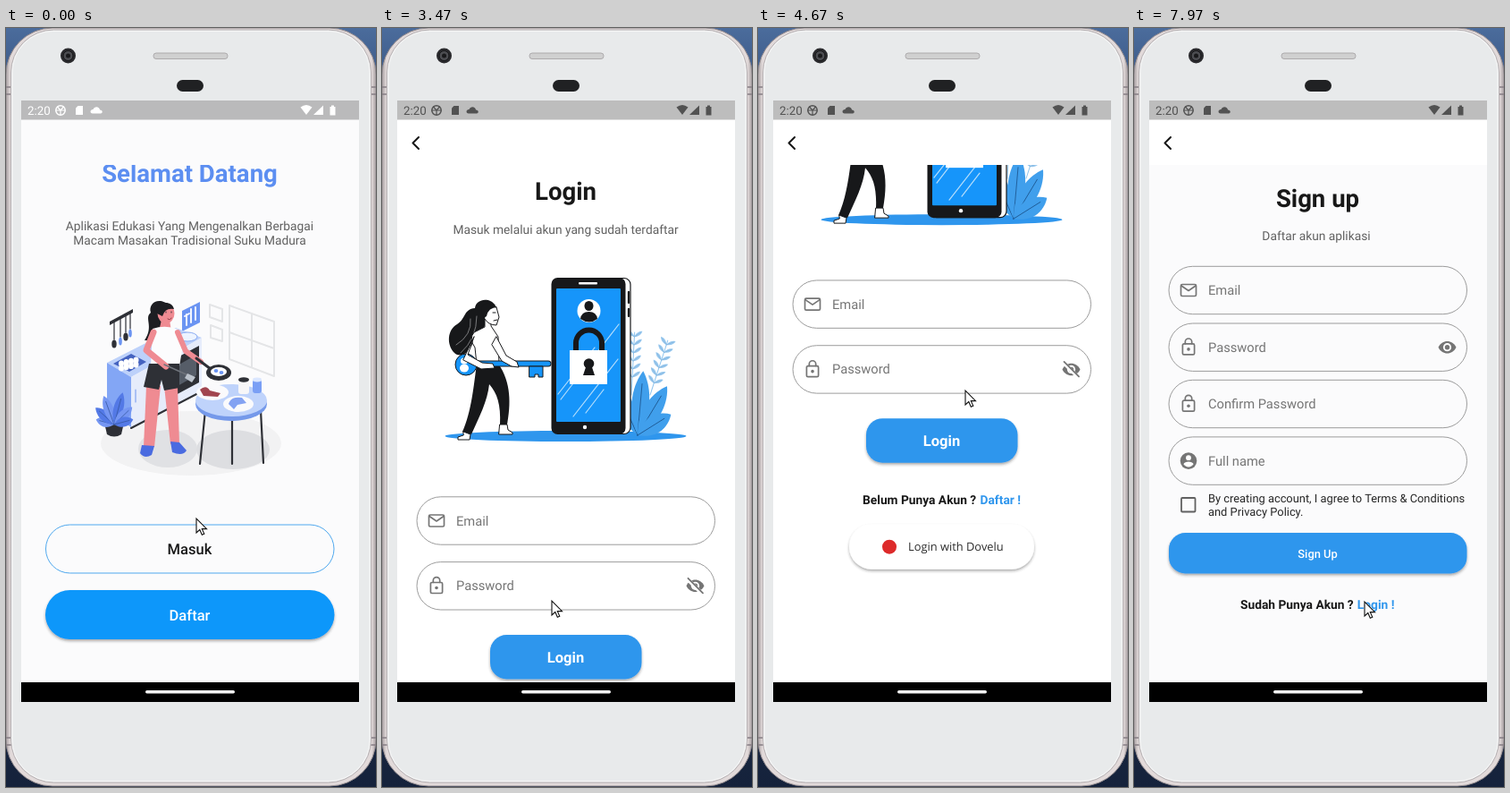
Recreate the animation shown at these times as an HTML page. Size 414 px wide and 848 px high, loop 8000 ms.

```html
<!DOCTYPE html>
<html lang="id">
<head>
<meta charset="utf-8">
<title>Recipe app login</title>
<style>
html, body { margin: 0; width: 100%; height: 100%; overflow: hidden; background: #17253f; }
svg { display: block; width: 414px; height: 848px; }
text { font-family: Roboto, Arial, sans-serif; white-space: pre; text-rendering: geometricPrecision; }
text.open { font-family: "Open Sans", "Noto Sans", sans-serif; }
</style>
</head>
<body>
<svg id="stage" viewBox="0 0 414 848" xmlns="http://www.w3.org/2000/svg">
  <defs>
    <linearGradient id="backdrop" x2="0" y2="1">
      <stop offset="0" stop-color="#4b6c9c"/><stop offset=".1" stop-color="#34507d"/><stop offset="1" stop-color="#15223b"/>
    </linearGradient>
    <linearGradient id="rim">
      <stop offset="0" stop-color="#aaa2a4"/><stop offset=".012" stop-color="#e2dada"/>
      <stop offset=".988" stop-color="#e2dada"/><stop offset="1" stop-color="#aaa2a4"/>
    </linearGradient>
    <clipPath id="screen"><rect x="17" y="81" width="378" height="650"/></clipPath>
    <clipPath id="body"><rect x="17" y="153" width="378" height="578"/></clipPath>
    <filter id="shadow" x="-10%" y="-20%" width="120%" height="150%">
      <feDropShadow dx="0" dy="2" stdDeviation="1.5" flood-color="#333" flood-opacity=".4"/>
    </filter>
  </defs>

  <rect width="414" height="848" fill="url(#backdrop)"/>
  <rect x="301" width="11" height="2" fill="#8f6670"/>
  <rect x="0" y="0" width="414" height="847" rx="52" fill="url(#rim)" stroke="#8f888c"/>
  <path d="M0 66h6M0 74h6M408 66h6M408 74h6M0 793h6M0 801h6M408 793h6M408 801h6" stroke="#857e84" stroke-width="1.5"/>
  <rect x="5.5" y="2" width="403" height="841" rx="48" fill="#e8eaeb" stroke="#b6b0b2"/>
  <rect x="7" y="3.500" width="400" height="838" rx="46" fill="none" stroke="#f7f7f7"/>
  <circle cx="69.500" cy="31" r="8.500" fill="#2a2a2d"/>
  <circle cx="69.500" cy="31" r="5.500" fill="#4c4d51" stroke="#141416"/>
  <circle cx="69.500" cy="31" r="2.500" fill="#19191b"/>
  <rect x="165" y="28" width="83" height="6.500" rx="3" fill="#d0d0d0" stroke="#adabac"/>
  <rect x="191" y="58" width="30" height="13" rx="6.500" fill="#202123"/>

  <g clip-path="url(#screen)">
    <g id="welcome"></g>
    <g id="login"></g>
    <g id="signup"></g>
    <rect x="17" y="81" width="378" height="21.500" fill="#000" fill-opacity=".26"/>
    <g id="status"></g>
  </g>
  <rect x="17" y="731" width="378" height="22"/>
  <rect x="156" y="740" width="100" height="3.500" rx="1.700" fill="#f5f5f5"/>
  <path id="cursor" d="M0 0V16L3.800 12.500 6.300 18.300 8.800 17.200 6.300 11.600H11.500Z" fill="#fff" stroke="#111" stroke-width="1.100"/>
</svg>

<script>
const $ = id => document.getElementById(id);
const INK = '#181818', MUTED = '#616161', HINT = '#757575', BLUE = '#2f96ed', WHITE = '#fff';

// Markup helpers
const text = (x, y, size, str, fill, weight = 400, anchor = 'middle', extra = '') =>
  `<text x="${x}" y="${y}" font-size="${size}" fill="${fill}" font-weight="${weight}" text-anchor="${anchor}" ${extra}>${str}</text>`;
const path = (d, fill, stroke = 'none', width = 1) =>
  `<path d="${d}" fill="${fill}" stroke="${stroke}" stroke-width="${width}" stroke-linecap="round" stroke-linejoin="round"/>`;
const line = (d, stroke, width = 1) => path(d, 'none', stroke, width);
const oval = (x, y, rx, ry, fill, extra = '') =>
  `<ellipse cx="${x}" cy="${y}" rx="${rx}" ry="${ry}" fill="${fill}" ${extra}/>`;
const box = (x, y, w, h, r, fill, extra = '') =>
  `<rect x="${x}" y="${y}" width="${w}" height="${h}" rx="${r}" fill="${fill}" ${extra}/>`;
const at = (x, y, inner) => `<g transform="translate(${x} ${y})">${inner}</g>`;
const leaf = (x, y, angle, length, width, fill, vein) =>
  `<g transform="translate(${x} ${y}) rotate(${angle})">` +
  path(`M0 0C${-width} ${-length * .4} ${-width * .6} ${-length * .8} 0 ${-length}C${width * .6} ${-length * .8} ${width} ${-length * .4} 0 0`, fill) +
  line(`M0 0V${-length * .8}`, vein, .7) + '</g>';

const eye = path('M-10 0C-6 -9 6 -9 10 0C6 9 -6 9 -10 0Z', HINT) +
  oval(0, 0, 4.6, 4.6, WHITE) + oval(0, 0, 2.7, 2.7, HINT);
const icons = {
  mail: box(-8.5, -6.5, 17, 13, 1.5, 'none', `stroke="${HINT}" stroke-width="1.7"`) + line('M-8 -5L0 .5 8 -5', HINT, 1.7),
  lock: box(-6.6, -3.8, 13.2, 12, 1.5, 'none', `stroke="${HINT}" stroke-width="1.7"`) +
    line('M-3.700 -4V-6A3.700 3.700 0 0 1 3.700 -6V-4', HINT, 1.7) + oval(0, 2.2, 1.8, 1.8, HINT),
  user: oval(0, 0, 9.3, 9.3, HINT) + oval(0, -3.4, 2.9, 2.9, WHITE) + path('M-5.600 3.700C-4 0 4 0 5.600 3.700C3 7.800 -3 7.800 -5.600 3.700Z', WHITE),
  eye,
  eyeOff: eye + line('M-9 -7.800L7.500 8.700', WHITE, 4) + line('M-8 -8.500L8.500 8', HINT, 1.8)
};
const field = (y, icon, label, right) =>
  box(39, y - 26.7, 333.5, 53.4, 26.7, 'none', 'stroke="#9c9c9c"') +
  at(61, y, icons[icon]) + text(83, y + 5, 14.7, label, HINT, 400, 'start') +
  (right ? at(350.5, y, icons[right]) : '');
const page = (bg, body, bar = '') =>
  box(17, 81, 378, 650, 0, bg) + bar + `<g clip-path="url(#body)">${body}</g>`;
const back = line('M41 122L34.500 128.500 41 135', INK, 2);

function kitchen() {
  const skin = '#ef8b92', dark = '#2e3036', hair = '#1d1e22', blue = '#6b94f2', pale = '#bdd1fa', grey = '#e4e5e7';
  let s = oval(207, 464, 101, 36, '#f2f2f3') + oval(181, 470, 33, 21, '#e0e1e4') + oval(254, 471, 41, 22, '#dddee1');
  // Window and wall frames
  s += line('M250 310L300 328V389L250 370ZM275 319V379M250 340L300 358M228 309L242 314V328L228 323ZM229 332L242 337V350L229 346Z', grey, 2);
  // Hanging tools
  s += path('M116 328L142 314V318L116 332Z', dark);
  [[121, 327, 26], [128, 323, 27], [134, 320, 25], [139, 318, 23]].forEach(([x, y, h], i) => {
    s += line(`M${x} ${y}V${y + h - 5}`, dark, 1.2) + oval(x, y + h, i % 2 ? 1.8 : 2.7, 4.5, i % 2 ? blue : dark);
  });
  // Shelf and counters
  s += path('M197 316L217 306V329L197 339Z', blue) + line('M202 332V320M207 329V314M212 326V312M200 322L205 319', '#f4f7ff', 2);
  s += path('M113 374L190 335 219 346 140 390Z', pale) + path('M113 374L140 390V446L113 429Z', '#83a6f5') +
    path('M140 390L219 346V405L140 446Z', '#e6ecfb') + path('M188 370L216 355V396L188 411Z', dark) +
    path('M192 377L213 365V388L192 400Z', '#565d68') + line('M140 447L219 406', dark, 2) +
    line('M164 378V432M145 404V418M169 390V404', '#84a5f0', 1.2);
  s += oval(203, 345, 11, 5, '#edf4ff', 'stroke="#8aabf2"');
  s += path('M120 375L140 364 157 373 138 384Z', '#4563c0');
  for (let i = 0; i < 8; i++) s += oval(129 + i % 4 * 5.5, 375 - i % 4 * 1.3 + (i >> 2) * 5, 3, 3.6, WHITE);
  // Potted plant
  s += path('M110 441H132L129 454Q121 459 113 454Z', dark);
  [[-75, 21], [-48, 28], [-20, 34], [15, 37], [46, 28], [75, 22]].forEach(([a, l], i) => {
    s += leaf(121, 443, a, l, 9, i % 2 ? '#5379e6' : '#7596f2', '#34569f');
  });
  // Table
  s += line('M223 427L217 487M285 427L288 486M253 434V487', dark, 2.2) + oval(252, 420, 40, 19, '#7599ea') + oval(252, 416, 40, 18, '#bfd3fb');
  s += oval(231, 407, 18, 9, '#fafafc') + path('M217 404Q224 398 228 405L240 408 237 412 221 411Z', '#a1454f') +
    oval(260, 420, 17, 9, '#fafafc') + path('M249 420Q252 411 264 413L269 419 259 421 255 426Z', '#83a2f2');
  s += box(260, 393, 12, 16, 3, '#f6f6f8') + oval(266, 393, 6, 2.7, dark) + box(276, 393, 10, 15, 3, '#7a9ff5') + oval(281, 393, 5, 2.4, '#dbe7ff');
  // Cook
  s += path('M179 307C168 301 159 309 162 318C154 324 166 333 155 349C169 350 174 335 176 328Z', hair);
  s += path('M157 400H173L166 468H154Z', skin) + path('M177 400H192L194 465H184Z', skin) +
    path('M152 466L166 467 163 477Q155 482 150 475Z', '#4a6be0') + path('M184 462L194 463 202 472Q198 479 186 474Z', '#4a6be0');
  s += oval(179, 319, 9.5, 11, skin) + path('M174 326H183L185 339H171Z', skin) +
    path('M169 319C166 305 186 303 188 314Q178 312 175 322Z', hair) + line('M181 325Q184 327 185 324', '#8d3c45') +
    line('M179 317V318M185 317V318', dark);
  s += path('M164 336Q179 331 193 337L197 360 194 378H162Z', '#fcfcfd') + path('M160 375H194V402L177 405 174 393 171 404 154 401Z', dark);
  s += line('M165 340L157 360 179 378', skin, 7) + line('M192 340L201 361 218 373', skin, 6) +
    line('M177 376L206 389', '#70747c', 1.5) + path('M203 386L212 390 208 396 200 391Z', '#bcc3cc');
  s += line('M213 369L229 381', dark, 3) + oval(238, 385, 14, 9, dark) + oval(238, 384, 9, 5, WHITE) +
    oval(235, 383, 2.4, 2, blue) + oval(241, 385, 2.4, 2, blue);
  return s;
}

function security() {
  const blue = '#1695fa', black = '#17181a';
  let s = oval(205.5, 456, 135, 6, BLUE);
  // Plants
  [[-24, 70], [5, 72], [31, 64], [58, 44]].forEach(([a, l]) => { s += leaf(286, 455, a, l, 16, '#409fec', '#174a80'); });
  const sprig = (x, y, h, tilt) => {
    let g = line(`M0 0V${-h}`, '#90c5ee', 1);
    for (let i = 0; i < 6; i++) for (const side of [-1, 1]) g += leaf(0, -h + i * 9 + 5, side * 52, 11, 3, '#9bcaf0', '#82b5dd');
    return `<g transform="translate(${x} ${y}) rotate(${tilt})">${g}</g>`;
  };
  s += sprig(279, 410, 70, 3) + sprig(300, 410, 64, 18);
  // Phone
  s += box(193, 279.5, 85, 174, 7, WHITE, `stroke="${black}" stroke-width="1.2"`) + box(189.5, 279, 83, 175, 7, black) +
    box(195, 291, 72, 149, 1, blue) + box(220, 284, 21, 2.5, 1, WHITE) + oval(227, 446, 2.2, 2.2, WHITE) +
    line('M276 295V307M276 314V322', black, 2.3);
  s += line('M200 415L265 331M197 409L238 357M214 434L264 370M228 430L248 404', '#b5defc', 1.2);
  s += oval(231.5, 316, 13, 13, WHITE) + oval(231.5, 310.5, 5, 5.5, black) + path('M222 325Q223 317 231.500 317T241 325Q232 332 222 325Z', black);
  s += line('M217 361V352A14 14 0 0 1 246 352V361', black, 6) + box(210, 360, 42, 38, 0, WHITE) +
    oval(231.5, 375, 5.8, 5.8, black) + path('M229 376H234L238 388H225Z', black);
  // Person carrying the key
  s += path('M127 310C120 300 105 303 104 313C91 314 94 325 84 331C73 337 72 354 81 363C90 371 101 358 102 350C109 341 114 338 116 329Z', black);
  s += line('M83 354Q101 343 99 325M88 363Q106 347 106 322', '#a5a5a8', .7);
  s += path('M106 375H130C145 396 144 421 140 443H132C133 421 129 408 120 398C118 417 109 434 100 454L90 451C100 430 103 397 106 375Z', black);
  s += path('M91 451L99 454 98 460H85V457L91 455Z', WHITE, black) + path('M132 443H140L141 449 146 452V454H131Z', WHITE, black);
  s += path('M115 322V334L103 340Q97 347 104 357L106 376H131L130 345 122 333V327Z', WHITE, black);
  s += path('M114 313Q120 308 128 312L131 323 128 332Q119 332 115 325Z', WHITE, black) +
    path('M114 324C107 309 116 303 129 312Q119 312 117 322Z', black) + line('M125 327L129 326M124 318L127 318', black);
  s += line('M106 375H186', black, 7) + line('M106 375H186', blue, 5) +
    path('M165 378H180V390H175V387H171V390H165Z', blue, black) + oval(94, 376, 12, 12, blue, `stroke="${black}"`) +
    oval(92, 372, 4, 3.5, WHITE) + oval(92, 380, 5, 4.5, WHITE);
  s += path('M103 345L96 365 112 374 124 375 126 380 111 381 91 371Z', WHITE, black) +
    path('M128 345L139 366 151 373 153 379 145 378 134 372 123 354Z', WHITE, black);
  return s;
}

$('welcome').innerHTML = page('#fbfbfc',
  text(205.5, 172, 27.56, 'Selamat Datang', '#5c8ef1', 700) +
  text(205.5, 226, 13.78, 'Aplikasi Edukasi Yang Mengenalkan Berbagai', MUTED) +
  text(205.5, 242, 13.78, 'Macam Masakan Tradisional Suku Madura', MUTED) + kitchen() +
  box(44.5, 555, 322.5, 54, 27, 'none', 'stroke="#4fa8ee"') + text(205.5, 588, 16.54, 'Masuk', INK, 500) +
  box(44, 628, 323.5, 55, 27.5, '#0d97fa', 'filter="url(#shadow)"') + text(205.5, 662, 16.54, 'Daftar', WHITE, 500));

$('login').innerHTML = page(WHITE, '<g id="scroll">' +
  text(205.5, 192, 27.56, 'Login', INK, 700) +
  text(205.5, 230, 13.78, 'Masuk melalui akun yang sudah terdaftar', MUTED) + security() +
  field(550.5, 'mail', 'Email') + field(623.3, 'lock', 'Password', 'eyeOff') +
  box(121, 678, 169.5, 49.5, 18.4, BLUE, 'filter="url(#shadow)"') + text(205.5, 709, 16.54, 'Login', WHITE, 700) +
  text(117, 773.5, 13.78, 'Belum Punya Akun ?', INK, 700, 'start') + text(294, 773.5, 13.78, 'Daftar !', BLUE, 700, 'end') +
  box(102, 796, 207, 50.5, 25, WHITE, 'filter="url(#shadow)"') + oval(147, 821.5, 8, 8, '#dd2a2a') +
  text(168, 825.5, 12.86, 'Login with Dovelu', '#2c2c2c', 400, 'start', 'class="open"') + '</g>', back);

$('signup').innerHTML = page(WHITE, box(17, 153, 378, 578, 0, '#fbfbfc') +
  text(205.5, 199.5, 27.56, 'Sign up', INK, 700) + text(204, 237, 13.78, 'Daftar akun aplikasi', MUTED) +
  field(293, 'mail', 'Email') + field(356.7, 'lock', 'Password', 'eye') +
  field(420, 'lock', 'Confirm Password') + field(483.6, 'user', 'Full name') +
  box(53, 525, 15.5, 15.5, 1, 'none', `stroke="${MUTED}" stroke-width="1.8"`) +
  text(83, 530, 12.86, 'By creating account, I agree to Terms &amp; Conditions', '#262626', 400, 'start') +
  text(83, 545, 12.86, 'and Privacy Policy.', '#262626', 400, 'start') +
  box(39, 564, 333.5, 45.5, 18.4, BLUE, 'filter="url(#shadow)"') + text(205.5, 591.5, 12.86, 'Sign Up', WHITE, 500) +
  text(119, 648.5, 13.78, 'Sudah Punya Akun ?', INK, 700, 'start') + text(291.5, 648.5, 13.78, 'Login !', BLUE, 700, 'end'), back);

$('status').innerHTML = text(24, 97, 13.3, '2:20', 'currentColor', 400, 'start') +
  oval(61, 92, 5.2, 5.2, 'none', 'stroke="currentColor" stroke-width="1.5"') +
  line('M56 92H66M61 92V97M57.500 88L61 92 64.500 88', 'currentColor', 1.2) +
  path('M80.500 87H86V97H78V89.500Z', 'currentColor') +
  path('M97 95.500C93 95 94.500 90.500 97.500 91C99 86.500 105 88 105 91.500C109 92 108 95.500 106 95.500Z', 'currentColor') +
  path('M329.500 88.500Q336 83.500 342.500 88.500L336 97Z', 'currentColor') + path('M344 97L355 86.500V97Z', 'currentColor') +
  path('M362.500 88H364V86.500H367V88H368.500V97.500H362.500Z', 'currentColor');

// Each key is [time, ...values, easing into it]
const ease = {
  linear: u => u,
  in: u => u * u,
  out: u => 1 - (1 - u) ** 3,
  both: u => u * u * (3 - 2 * u)
};
function track(keys, t) {
  const next = keys.findIndex(k => k[0] > t);
  if (next === 0) return keys[0].slice(1, -1);
  if (next < 0) return keys[keys.length - 1].slice(1, -1);
  const a = keys[next - 1], b = keys[next];
  const u = ease[b[b.length - 1]]((t - a[0]) / (b[0] - a[0]));
  return a.slice(1, -1).map((v, i) => v + (b[i + 1] - v) * u);
}

const LOOP = 8000;
const pointer = [
  [30, 213, 548, 'linear'], [400, 210, 558, 'both'], [770, 210, 558, 'linear'], [1240, 203, 573, 'both'],
  [2800, 203, 573, 'linear'], [3440, 190, 640, 'both'], [3630, 190, 640, 'linear'],
  [4270, 227, 432, 'in'], [4430, 232, 405, 'out'], [4700, 232, 405, 'linear'],
  [5800, 265, 520, 'both'], [6970, 265, 520, 'linear'], [7900, 258, 641, 'both']
];
const scrolling = [[3720, 0, 'linear'], [4270, 184.5, 'in'], [4430, 212, 'out'], [5100, 252.5, 'out']];
const loginSlide = [[2279, 378, 'linear'], [2579, 0, 'linear']];
const signupSlide = [[6560, 378, 'linear'], [6860, 0, 'linear']];
const statusTone = [[2380, 255, 255, 255, 'linear'], [2600, 82, 82, 82, 'linear']];

const move = (id, x, y) => $(id).setAttribute('transform', `translate(${x.toFixed(2)} ${y.toFixed(2)})`);
function draw(t) {
  move('login', track(loginSlide, t)[0], 0);
  move('signup', track(signupSlide, t)[0], 0);
  move('scroll', 0, -track(scrolling, t)[0]);
  move('cursor', ...track(pointer, t));
  $('status').style.color = `rgb(${track(statusTone, t).map(Math.round)})`;
}

const start = performance.now();
function tick() {
  draw((performance.now() - start) % LOOP);
  requestAnimationFrame(tick);
}
tick();
</script>
</body>
</html>
```
